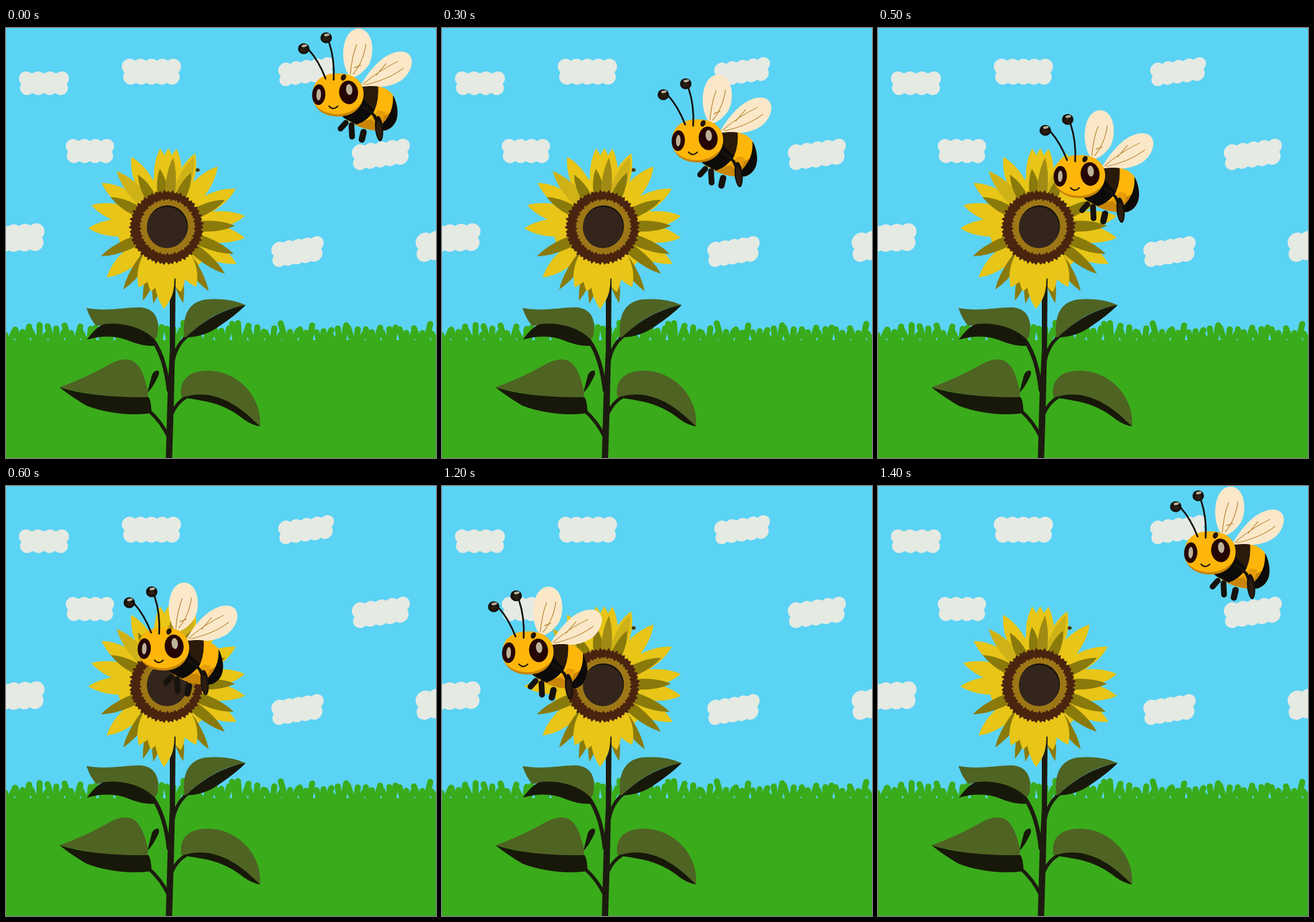
Animation, 748 px wide and 748 px high, one loop 1.5 s. Source, as an HTML page with a canvas:

```html
<!DOCTYPE html>
<html lang="en">
<head>
<meta charset="utf-8">
<title>Bee and sunflower</title>
<style>
html, body { margin: 0; width: 100%; height: 100%; overflow: hidden; background: #5bd3f4; }
canvas { display: block; width: 748px; height: 748px; }
</style>
</head>
<body>
<canvas id="stage" width="748" height="748"></canvas>
<script>
const SIZE = 748, STEP = 100, LOOP = 1500;
const ctx = document.getElementById('stage').getContext('2d');

// Key points of the flight: time, x, y
const flight = [
  [0, 0, 0], [200, -83, 34], [300, -133, 80], [500, -227, 142],
  [700, -380, 192], [1100, -380, 192], [1200, -428, 174], [1300, 25, 200], [1400, 0, 0]
];

function seeded(seed) {
  return () => (seed = (seed * 16807) % 2147483647) / 2147483647;
}

function fill(c, d, color) {
  c.fillStyle = color;
  c.fill(new Path2D(d));
}

function line(c, d, color, width) {
  c.strokeStyle = color;
  c.lineWidth = width;
  c.lineCap = c.lineJoin = 'round';
  c.stroke(new Path2D(d));
}

function oval(c, x, y, rx, ry, color, turn = 0) {
  c.fillStyle = color;
  c.beginPath();
  c.ellipse(x, y, rx, ry, turn, 0, Math.PI * 2);
  c.fill();
}

// Two rows of puffs joined in the middle; slope lifts the right end
function cloud(c, x, y, w, h, slope = 0) {
  const color = '#e5eae3', r = h * 0.3, n = Math.round(w / 20);
  const reach = w / 2 - r, rise = h / 2 - r;
  c.save();
  c.transform(1, -slope, 0, 1, x, y);
  c.fillStyle = color;
  c.fillRect(-reach, -h / 2 + 3, reach * 2, h - 6);
  for (let i = 0; i < n; i++) {
    const px = reach * (2 * i / (n - 1) - 1);
    oval(c, px, -rise, r, r, color);
    oval(c, px * 0.94, rise, r, r, color);
  }
  c.restore();
}

function drawSky(c) {
  c.fillStyle = '#5bd3f4';
  c.fillRect(0, 0, SIZE, SIZE);
  cloud(c, 66, 96, 87, 41);
  cloud(c, 253, 76, 103, 45);
  cloud(c, 146, 214, 84, 42);
  cloud(c, 23, 365, 88, 48, 0.04);
  cloud(c, 522, 76, 97, 41, 0.13);
  cloud(c, 652, 220, 101, 45, 0.13);
  cloud(c, 507, 389, 91, 44, 0.15);
  cloud(c, 757, 377, 89, 51, 0.15);
}

// Fans of three rounded blades
function drawGrass(c) {
  const green = '#3aab1b', rand = seeded(11);
  for (let x = 0; x < SIZE + 20; x += 29) {
    for (let k = -1; k <= 1; k++) {
      const tip = x + k * 13 + (rand() - 0.5) * 6;
      line(c, `M${x + k * 6} 546L${tip} ${535 - rand() * 22}`, green, 10.5);
    }
  }
  c.fillStyle = green;
  c.fillRect(0, 543, SIZE, SIZE - 543);
}

// A fan of pointed petals; angles in degrees, length may depend on the angle
function petals(c, angles, length, w, color) {
  for (const deg of angles) {
    const a = deg * Math.PI / 180;
    const len = typeof length === 'function' ? length(a) : length;
    c.save();
    c.translate(280, 346);
    c.rotate(a);
    fill(c, `M0 0Q${len * 0.64} ${-w} ${len} 0Q${len * 0.64} ${w} 0 0Z`, color);
    c.restore();
  }
}

function jagged(c, x, y, r, teeth, depth, color) {
  c.fillStyle = color;
  c.beginPath();
  for (let i = 0; i < teeth * 2; i++) {
    const a = i * Math.PI / teeth;
    const rad = r - (i % 2) * depth - Math.sin(i * 1.7) * depth * 0.3;
    c.lineTo(x + Math.cos(a) * rad, y + Math.sin(a) * rad);
  }
  c.fill();
}

function drawFlower(c) {
  const gold = '#e8c517', olive = '#8a7a0b', mustard = '#cfb218';
  oval(c, 333, 247, 4, 3, '#4b3a10');
  oval(c, 280, 346, 86, 86, gold);
  petals(c, [-8, 8, 28, 140, 179, 196, 214, 243, 265, 271, 277, 291, 310, 331], 137, 31, gold);
  petals(c, [228, 291], 131, 24, mustard);
  petals(c, [-25, -1, 22, 39, 57, 78, 100, 108, 125, 156, 208, 241, 263, 294],
    a => 119 + 17 * Math.sin(a), 19, olive);
  petals(c, [275], 121, 18, '#a18b14');
  petals(c, [64, 78, 104, 115], 116, 34, gold);
  petals(c, [92], 143, 38, gold);

  jagged(c, 279, 347, 65, 54, 4, '#4a240f');
  jagged(c, 281, 346, 49, 46, 3, '#9d7716');
  oval(c, 281, 345, 35.5, 36.5, '#15120c');
  oval(c, 280, 347, 35, 36, '#33251c');
}

function drawPlant(c) {
  const leaf = '#4f6323', dark = '#18180a', stem = '#1d1b10';
  line(c, 'M257 545Q277 575 283 630', stem, 7);
  line(c, 'M315 536Q296 552 291 578', stem, 6);
  line(c, 'M250 667Q270 685 282 710', stem, 6);
  line(c, 'M312 643Q298 651 289 670', stem, 6);
  fill(c, 'M293 436Q294 434 295 437L294 560L292 650L289 748H278L281 640L285 560L285 474Q293 460 293 436Z', stem);
  fill(c, 'M246 634L254 603Q258 595 265 596Q268 600 264 607Q254 628 246 634Z', dark);

  fill(c, 'M140 487C175 494 208 485 235 486C262 489 268 510 263 536L257 544Q223 512 157 518Q147 508 140 487Z', leaf);
  fill(c, 'M141 542Q157 519 171 515C205 511 240 522 259 542L257 553Q233 553 211 543Q180 531 141 542Z', dark);

  fill(c, 'M310 538C306 500 318 475 350 472Q390 469 417 482C378 489 350 503 313 538Z', leaf);
  fill(c, 'M417 482C377 488 339 512 313 538Q345 538 372 518Q399 500 417 482Z', dark);

  fill(c, 'M93 625Q138 609 180 585C217 566 236 578 247 633L246 645Q165 644 93 625Z', leaf);
  fill(c, 'M93 625Q155 644 248 642Q253 650 253 670C215 675 175 670 140 657Q116 643 93 625Z', dark);

  fill(c, 'M305 642C300 608 323 596 352 596C402 597 446 640 442 693L428 682C400 650 350 634 305 642Z', leaf);
  fill(c, 'M307 643C350 627 394 647 429 681L442 693Q428 691 414 681Q386 658 350 650Q326 645 307 643Z', dark);
}

function drawBee(c) {
  const ink = '#16120e', amber = '#ffb60a', shade = '#c98507', wing = '#fbe8c9', vein = '#b98a35';

  fill(c, 'M597 83C580 60 583 4 612 1C638 0 643 42 631 64Q620 80 605 86Z', wing);
  line(c, 'M599 80Q602 48 610 29M604 80Q622 58 626 28M606 69L617 65', vein, 1.4);
  fill(c, 'M616 101C634 70 659 41 688 41C713 42 711 73 688 91C666 105 641 104 616 101Z', wing);
  line(c, 'M621 98Q650 73 682 58M624 99Q665 90 691 70M644 82L661 62', vein, 1.2);

  c.save();
  c.clip(new Path2D('M617 103C650 97 670 105 677 125C686 151 680 171 661 178C630 182 599 167 584 153Z'));
  c.fillStyle = amber;
  c.fillRect(575, 90, 120, 100);
  fill(c, 'M600 160Q640 164 672 145L668 185H600Z', shade);
  fill(c, 'M632 158L648 143L660 146L656 160L645 166Z', '#e59d08');
  fill(c, 'M615 98L647 98Q650 130 637 151L615 135Z', '#2a1a0a');
  fill(c, 'M618 118Q632 136 641 143Q630 161 610 168L582 154L600 146Z', '#0d0b09');
  fill(c, 'M673 118Q676 155 638 181L690 185V118Z', '#0d0b09');
  c.restore();

  line(c, 'M591 165L582 175', ink, 10);
  line(c, 'M601 169L602 189', ink, 10);
  line(c, 'M622 181L619 194', ink, 11);
  line(c, 'M622 138Q632 142 641 153L645 163', ink, 5);
  oval(c, 649, 175, 7, 22, ink, -0.1);
  oval(c, 649, 178, 4.5, 16, '#2d1d10', -0.1);

  c.save();
  c.clip(new Path2D('M533 116C534 91 551 79 578 79C606 79 622 94 622 115C621 140 602 154 578 154C552 154 533 140 533 116Z'));
  c.fillStyle = shade;
  c.fillRect(530, 75, 95, 85);
  oval(c, 577, 110, 48, 40, amber, -0.05);
  c.restore();

  line(c, 'M526 37Q544 57 556 88', ink, 3);
  line(c, 'M562 25Q572 55 570 90', ink, 3);
  for (const [x, y] of [[518, 36], [557, 17]]) {
    oval(c, x, y, 10, 9.5, ink);
    oval(c, x + 1, y - 5, 5, 2.2, '#b9ae98', -0.2);
    oval(c, x, y + 2, 6, 4, '#2b1d12');
  }

  oval(c, 544, 116, 11.5, 18, '#250504', 0.05);
  oval(c, 544, 116, 4, 10, '#bdb298', 0.05);
  oval(c, 596, 112, 16.5, 20.5, '#250504', -0.1);
  oval(c, 597, 107, 5.5, 9.5, '#bdb298', -0.1);
  oval(c, 587, 86, 4.3, 5.8, '#21150a', 0.45);
  line(c, 'M562 136Q569 144 577 136', '#21150a', 2.4);
}

function beeAt(t) {
  const next = flight.findIndex(key => key[0] > t);
  if (next < 0) return [0, 0];
  const [t0, x0, y0] = flight[next - 1], [t1, x1, y1] = flight[next];
  const k = (t - t0) / (t1 - t0);
  return [x0 + (x1 - x0) * k, y0 + (y1 - y0) * k];
}

// The scenery never changes, so paint it once
const scene = document.createElement('canvas');
scene.width = scene.height = SIZE;
const sc = scene.getContext('2d');
[drawSky, drawGrass, drawFlower, drawPlant].forEach(draw => draw(sc));

function render(now) {
  const t = Math.floor((now % LOOP) / STEP) * STEP;
  ctx.drawImage(scene, 0, 0);
  ctx.save();
  ctx.translate(...beeAt(t));
  drawBee(ctx);
  ctx.restore();
}

let start;
function tick(now) {
  if (start === undefined) start = now;
  render(Math.max(0, now - start));
  requestAnimationFrame(tick);
}
render(0);
requestAnimationFrame(tick);
</script>
</body>
</html>
```
